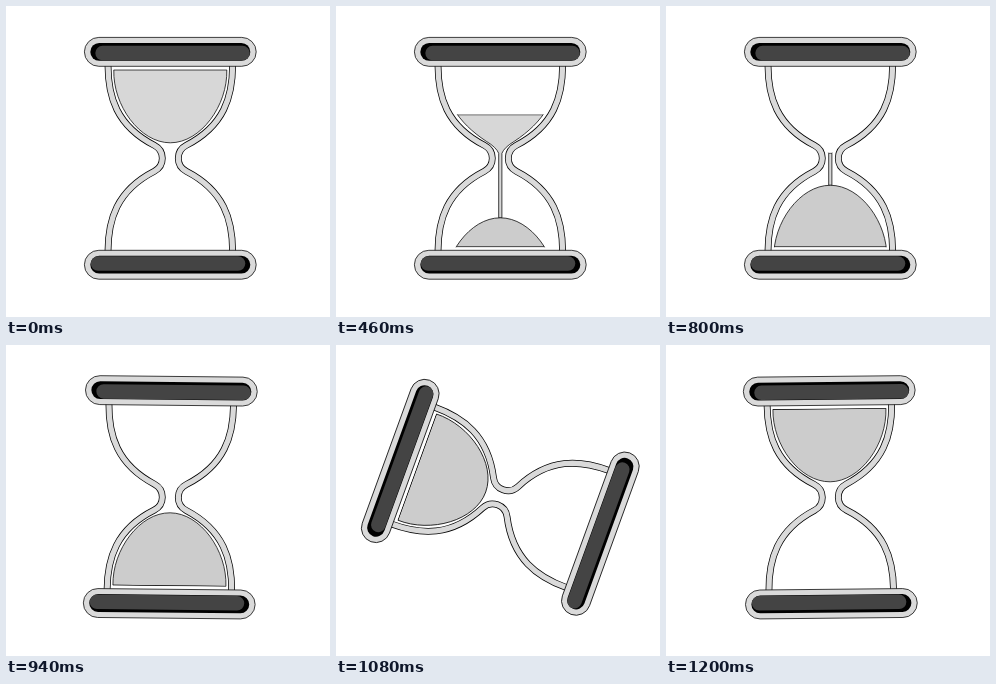
These frames come from a looping animation (324x311 px, 1220 ms). An HTML page with a canvas:

```html
<!DOCTYPE html>
<html lang="en">
<head>
<meta charset="utf-8">
<title>Hourglass</title>
<style>
  html, body { margin: 0; width: 100%; height: 100%; overflow: hidden; background: #fff; }
  canvas { display: block; }
</style>
</head>
<body>
<canvas id="stage" width="324" height="311"></canvas>
<script>
const ctx = document.getElementById('stage').getContext('2d');
const LOOP = 1220, STEP = 20, FLIP = 920;
const RIM = -88.5, APEX = -15.5, SAND_W = 56.5, LINE = 0.75;
const lerp = (a, b, k) => a + (b - a) * k;

// Symmetric cubic Bezier easing with handles (a, 0) and (1 - a, 1).
function ease(x, a = 0.71) {
  let lo = 0, hi = 1;
  for (let i = 0; i < 30; i++) {
    const s = (lo + hi) / 2, r = 1 - s;
    if (3 * a * s * r * r + 3 * (1 - a) * s * s * r + s ** 3 < x) lo = s; else hi = s;
  }
  return lo * lo * (3 - 2 * lo);
}

function outlined(fill) {
  ctx.fillStyle = fill;
  ctx.fill();
  ctx.strokeStyle = '#000';
  ctx.lineWidth = LINE;
  ctx.stroke();
}

function pill(left, top, right, bottom) {
  ctx.beginPath();
  ctx.roundRect(left, top, right - left, bottom - top, (bottom - top) / 2);
}

function drawGlass() {
  ctx.beginPath();
  for (const side of [-1, 1]) {
    ctx.moveTo(62.3 * side, -93);
    ctx.bezierCurveTo(62.3 * side, -62, 54 * side, -32.5, 16 * side, -13);
    ctx.bezierCurveTo(10.6 * side, -10.2, 8 * side, -5, 8 * side, 0);
    ctx.bezierCurveTo(8 * side, 5, 10.6 * side, 10.2, 16 * side, 13);
    ctx.bezierCurveTo(54 * side, 32.5, 62.3 * side, 62, 62.3 * side, 93);
  }
  for (const [width, color] of [[6.8, '#000'], [6.8 - 2 * LINE, '#dadada']]) {
    ctx.lineWidth = width;
    ctx.strokeStyle = color;
    ctx.stroke();
  }
}

function drawCap() {
  pill(-85.9, -120.9, 85.9, -92);
  outlined('#dadada');
  ctx.fillStyle = '#000';
  pill(-80, -115.3, 80, -97.5);
  ctx.fill();
  ctx.fillStyle = '#444';
  pill(-75, -112.5, 79.5, -98);
  ctx.fill();
}

// Bowl of sand; with open = 1 it becomes a funnel whose stream reaches down to tip.
function bowlPath(open = 0, tip = APEX) {
  const c1 = [57.5, lerp(-53, -60, open)];
  const c2 = [lerp(30.5, 43, open), lerp(APEX, -36, open)];
  const lip = [14 * open, lerp(APEX, -17, open)];
  const bend = [4 * open, lerp(APEX, -11, open)];
  const neck = [1.6 * open, Math.min(-5, tip)];
  ctx.beginPath();
  ctx.moveTo(-SAND_W, RIM);
  ctx.bezierCurveTo(-c1[0], c1[1], -c2[0], c2[1], -lip[0], lip[1]);
  ctx.quadraticCurveTo(-bend[0], bend[1], -neck[0], neck[1]);
  ctx.lineTo(-neck[0], tip);
  ctx.lineTo(neck[0], tip);
  ctx.lineTo(neck[0], neck[1]);
  ctx.quadraticCurveTo(bend[0], bend[1], lip[0], lip[1]);
  ctx.bezierCurveTo(c2[0], c2[1], c1[0], c1[1], SAND_W, RIM);
  ctx.closePath();
}

// Fills the current sand path below the line y = level, with an edge along it.
function fillBelow(level, makePath, fill) {
  ctx.save();
  ctx.beginPath();
  ctx.rect(-80, level - LINE / 2, 160, 200);
  ctx.clip();
  makePath();
  outlined(fill);
  ctx.clip();
  ctx.fillStyle = '#000';
  ctx.fillRect(-80, level - LINE / 2, 160, LINE);
  ctx.restore();
}

function drawUpperSand(t, sunk) {
  const level = RIM + 0.0894 * t + 1.84e-5 * t * t;
  const tip = Math.min(-RIM, APEX + 0.67 * t, sunk - APEX);
  if (level < tip) fillBelow(level, () => bowlPath(Math.min(t / 100, 1), tip), '#d7d7d7');
}

// The mound is the bowl upside down, rising through the floor.
function drawMound(sunk) {
  if (sunk >= APEX - RIM) return;
  ctx.save();
  ctx.rotate(Math.PI);
  fillBelow(RIM, () => {
    ctx.translate(0, -sunk);
    bowlPath();
    ctx.translate(0, sunk);
  }, '#ccc');
  ctx.restore();
}

function draw(t) {
  ctx.setTransform(1, 0, 0, 1, 0, 0);
  ctx.fillStyle = '#fff';
  ctx.fillRect(0, 0, 324, 311);
  ctx.translate(164.3, 152.3);
  if (t > FLIP) ctx.rotate(Math.PI * ease((t - FLIP) / (LOOP - FLIP)));

  drawGlass();
  drawCap();
  ctx.save();
  ctx.rotate(Math.PI);
  drawCap();
  ctx.restore();

  const sunk = 88 * Math.max(0, 1 - t / FLIP);
  if (t < FLIP) drawUpperSand(t, sunk);
  drawMound(sunk);
}

const start = performance.now();
function tick() {
  const t = (performance.now() - start) % LOOP;
  draw(Math.floor(t / STEP) * STEP);
  requestAnimationFrame(tick);
}
tick();
</script>
</body>
</html>
```
